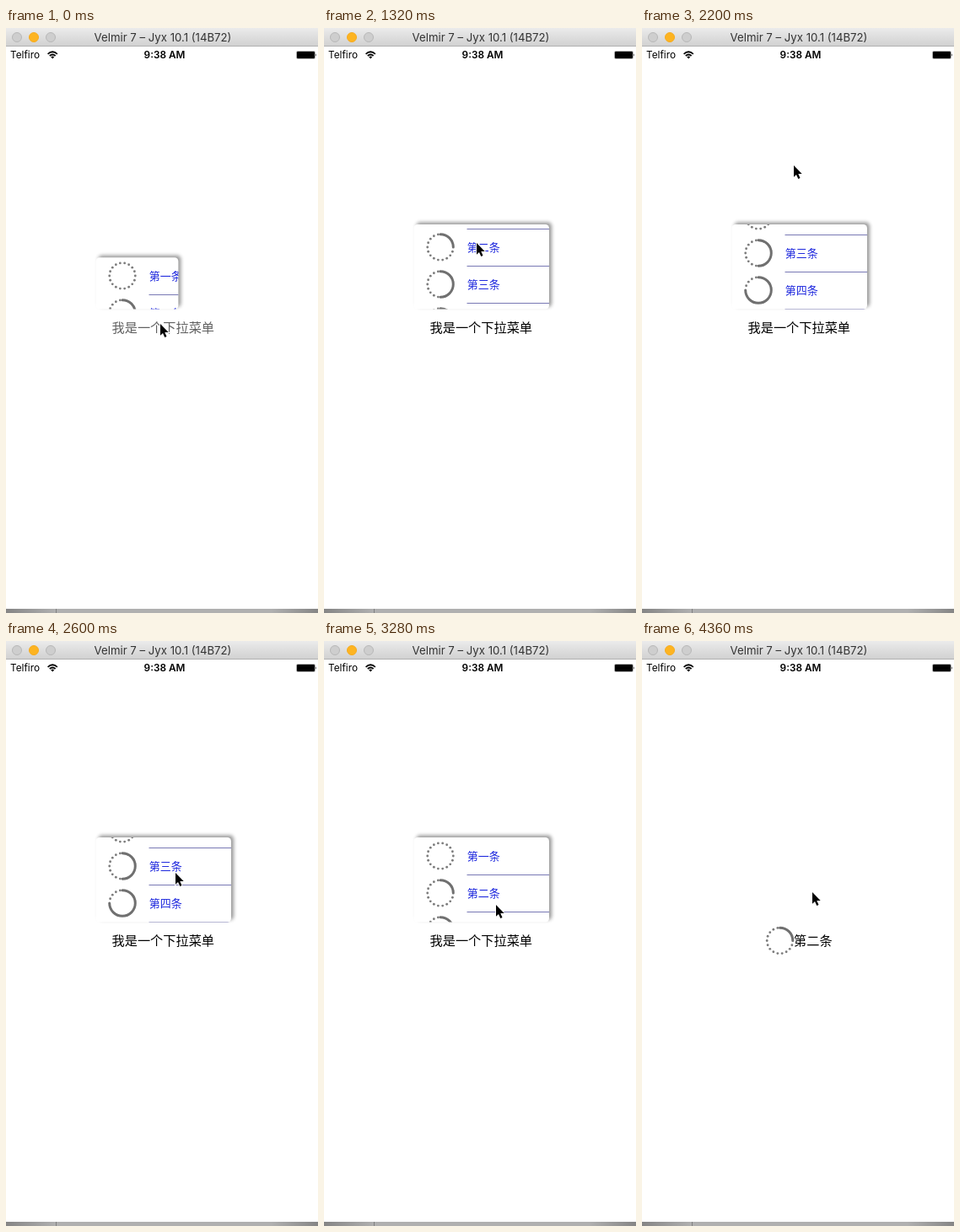
Write an HTML page that moves like this. It is 370 px wide and 694 px high and loops after 4.48 s.

```html
<!DOCTYPE html>
<html lang="zh-CN">
<head>
<meta charset="utf-8">
<title>下拉菜单</title>
<style>
  html, body { margin: 0; width: 100%; height: 100%; overflow: hidden; background: #fff; }
  svg { display: block; width: 100vw; height: 100vh; }
  text { font-family: "Noto Sans CJK SC", "Noto Sans CJK", "Noto Sans CJK JP", sans-serif; }
  .ui { font-family: Inter, Roboto, sans-serif; }
  .row { font-size: 13px; fill: #1c26dd; }
  .label { font-size: 15.2px; }
</style>
</head>
<body>
<svg viewBox="0 0 370 694">
  <defs>
    <linearGradient id="bar" x2="0" y2="1">
      <stop stop-color="#ebebeb"/><stop offset="1" stop-color="#d0d0d0"/>
    </linearGradient>
    <linearGradient id="foot">
      <stop stop-color="#858585"/><stop offset=".16" stop-color="#b0b0b0"/>
      <stop offset=".85" stop-color="#b0b0b0"/><stop offset="1" stop-color="#858585"/>
    </linearGradient>
    <filter id="blur" x="-20%" y="-20%" width="140%" height="140%"><feGaussianBlur stdDeviation="2"/></filter>
    <clipPath id="clip"><rect class="box" x="106.5" rx="4.5"/></clipPath>
  </defs>

  <rect width="370" height="694" fill="#fff"/>
  <rect y="689" width="370" height="5" fill="url(#foot)"/>
  <path d="M59.5 689V694" stroke="#808080"/>

  <rect width="370" height="22" fill="url(#bar)"/>
  <path d="M0 21.5H370" stroke="#b1b1b1"/>
  <circle cx="13" cy="11" r="5.5" fill="#cecece" stroke="#b8b8b8"/>
  <circle cx="33" cy="11" r="5.5" fill="#fdb421" stroke="#f6ab1e"/>
  <circle cx="53" cy="11" r="5.5" fill="#cecece" stroke="#b8b8b8"/>
  <text class="ui" x="186" y="16" font-size="13.2" text-anchor="middle" fill="#333">Velmir 7 – Jyx 10.1 (14B72)</text>

  <text class="ui" x="5" y="36.3" font-size="11.8">Telfiro</text>
  <g fill="none" stroke="#000" stroke-width="1.8">
    <path d="M49.6 30.8Q55.2 25.6 60.8 30.8M51.8 33Q55.2 30 58.6 33"/>
    <path d="M53.2 34.2Q55.2 32.6 57.2 34.2L55.2 36.5Z" fill="#000" stroke="none"/>
  </g>
  <text class="ui" x="188" y="36.3" font-size="11.8" font-weight="600" text-anchor="middle">9:38 AM</text>
  <rect x="344.5" y="27.5" width="22" height="9" rx="1.5" fill="none" stroke="#666" stroke-width=".5"/>
  <rect x="345" y="28" width="21" height="8" rx="1"/>
  <path d="M367.3 30.2Q368.8 32 367.3 33.8Z"/>

  <text class="label" id="oldText" y="361.3">我是一个下拉菜单</text>
  <text class="label" id="newText" x="180" y="361.3">第二条</text>
  <g id="mark"></g>

  <g id="menu">
    <rect class="box" id="shade" x="109.5" rx="4.5" fill="#000" filter="url(#blur)"/>
    <rect class="box" x="106.5" rx="4.5" fill="#fff"/>
    <g clip-path="url(#clip)"><g id="rows"></g></g>
  </g>

  <path id="cursor" d="M0 0V13.8L3 11L5.3 16L7.5 15L5.3 10.1H9.7Z" stroke="#fff" stroke-width="1.8" paint-order="stroke"/>
</svg>
<script>
const LOOP = 4480, STEP = 40;
const BOTTOM = 333.5, WIDTH = 160.5, HEIGHT = 100.5, ROW = 44, MAX_SCROLL = 76;
const TURN = 2260, RELEASE = 2920, PICK = 3560, CLOSE = 3640;
const $ = id => document.getElementById(id);
const clamp = (v, lo, hi) => Math.min(hi, Math.max(lo, v));

// Eased progress from 0 to 1 between two times
function ease(t, from, to) {
  const u = clamp((t - from) / (to - from), 0, 1);
  return u * u * (3 - 2 * u);
}

// The pointer goes up, comes back down, then settles on the second row
function pointer(t) {
  const up = ease(t, 600, 2020), back = ease(t, 2960, 3400);
  return {
    x: 183 - 3 * up + 31 * ease(t, TURN, 2800) - 9 * back,
    y: 351 - 188 * up + 215 * ease(t, TURN, RELEASE) - 80 * back
  };
}

// The list follows the pointer from where it was grabbed
function scroll(t) {
  const grab = t < TURN ? 294 : 376;
  return clamp(grab - pointer(Math.min(t, RELEASE)).y, 0, MAX_SCROLL);
}

// Ring of dots with the first `quarters` quarters drawn solid
function ring(cx, cy, quarters) {
  const r = 15.3, end = quarters * Math.PI / 2;
  const at = a => [cx + r * Math.sin(a), cy - r * Math.cos(a)];
  let out = "";
  for (let i = 0; i < 18; i++) {
    const a = (i + .5) * Math.PI / 9, [x, y] = at(a);
    if (a > end) out += `<circle cx="${x}" cy="${y}" r="1.4" fill="#7c7c7c"/>`;
  }
  if (quarters) {
    out += `<path d="M${at(0)}A${r} ${r} 0 ${+(quarters > 2)} 1 ${at(end)}"
      fill="none" stroke="#707070" stroke-width="3" stroke-linecap="round"/>`;
  }
  return out;
}

$("rows").innerHTML = `<rect id="pick" x="106" y="${ROW - 1}" width="162" height="${ROW}" fill="#00d600"/>` +
  [..."一二三四"].map((n, i) => {
    const y = i * ROW;
    return ring(138, y + 22, i) + `<text class="row" x="169.7" y="${y + 26.9}">第${n}条</text>` +
      `<path class="line" d="M169.5 ${y + ROW + .5}H268" stroke="#7878b4"/>`;
  }).join("");
$("mark").innerHTML = ring(163.5, 355.5, 1);

const boxes = document.querySelectorAll(".box");
const edges = [...document.querySelectorAll(".line")].slice(0, 2);
const set = (el, attrs) => { for (const k in attrs) el.setAttribute(k, attrs[k]); };
const show = (el, on) => set(el, { visibility: on ? "visible" : "hidden" });

function draw(t) {
  const grow = .61 + .39 * ease(t, -80, 160) * (t < 160) + .39 * (t >= 160);
  const open = 1 - ease(t, CLOSE, 3920);
  const scale = t < 160 ? .61 + .39 * ease(t, 0, 160) : 1;
  const width = WIDTH * scale, height = HEIGHT * scale * open, top = BOTTOM - height;
  for (const b of boxes) set(b, { y: top, width, height });
  set($("shade"), { y: top - 2.5, opacity: .4 * open });
  set($("rows"), { transform: `translate(0 ${Math.round(top - scroll(t))})` });
  show($("menu"), height > .5);

  const picked = t >= PICK, chosen = t >= CLOSE;
  show($("pick"), picked);
  for (const e of edges) show(e, !picked);

  set($("oldText"), { x: chosen ? 142 : 125.5, opacity: .62 + .38 * ease(t, 0, 240) - ease(t, 3600, 3800) });
  set($("newText"), { opacity: ease(t, 3800, 4160) });
  show($("mark"), chosen);

  const p = pointer(t);
  set($("cursor"), { transform: `translate(${Math.round(p.x)} ${Math.round(p.y)})` });
}

const start = performance.now();
function tick(now) {
  const t = Math.max(0, now - start) % LOOP;
  draw(Math.floor(t / STEP) * STEP);
  requestAnimationFrame(tick);
}
draw(0);
requestAnimationFrame(tick);
</script>
</body>
</html>
```
